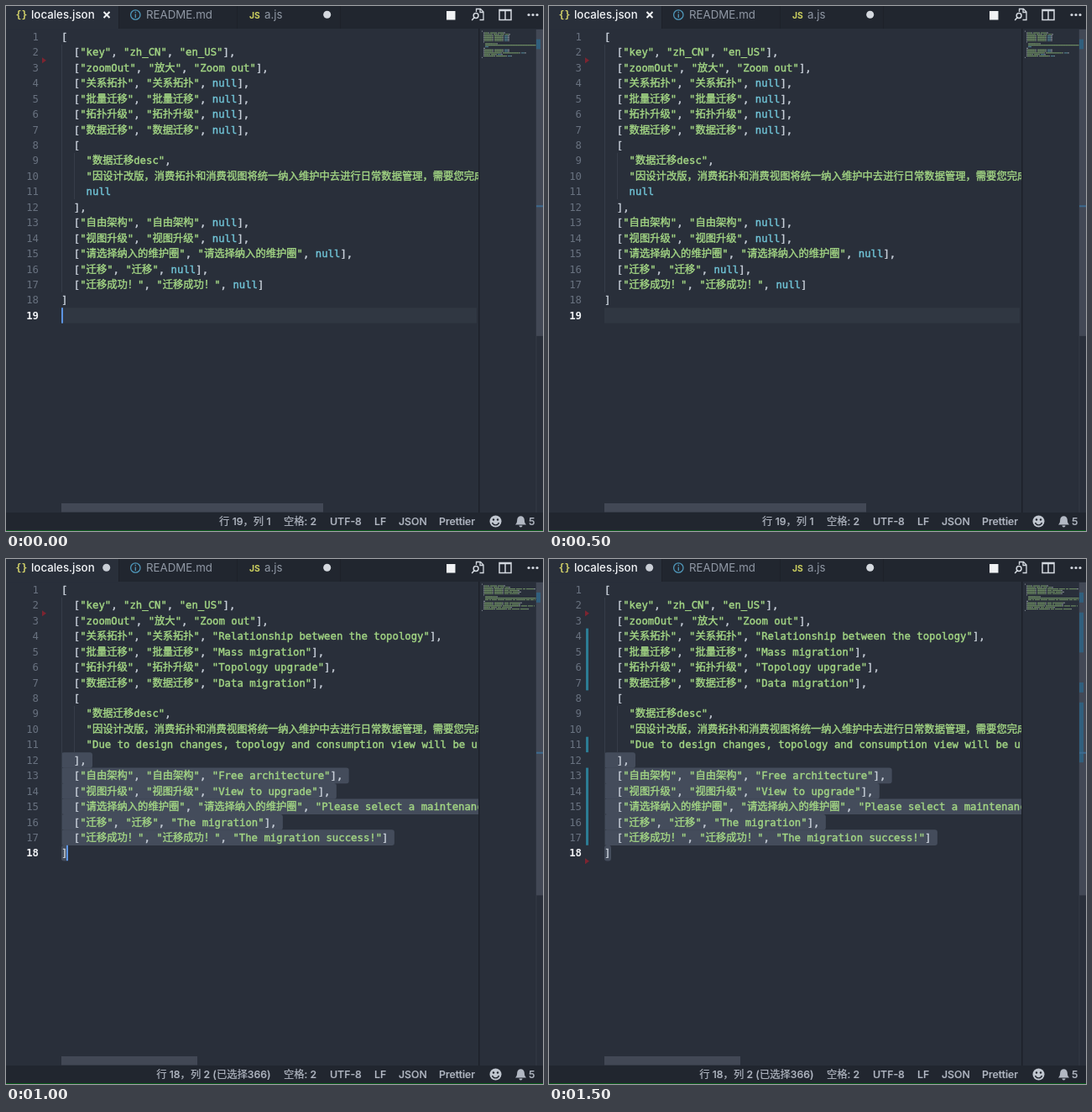
These frames come from a looping animation (640x625 px, 1.6 s). An HTML page with a canvas:

```html
<!DOCTYPE html>
<html lang="zh">
<head>
<meta charset="utf-8">
<style>
  html, body { margin: 0; width: 100%; height: 100%; overflow: hidden; background: #292f3a; }
  canvas { display: block; }
</style>
</head>
<body>
<canvas id="stage" width="640" height="625"></canvas>
<script>
const ctx = document.getElementById('stage').getContext('2d');
const LOOP = 1600, TRANSLATED = 1000, GUTTER = 1200;
const LEFT = 66, RIGHT = 563, TOP = 27.3, ROW = 18.44, CHAR = 7.405;
const MONO = '12.3px "DejaVu Sans Mono", "Noto Sans CJK SC", monospace';
const ui = (size, weight = 500) => `${weight} ${size}px Inter, "Noto Sans CJK TC", sans-serif`;
const C = {
  editor: '#292f3a', bar: '#21262f', line: '#1d2129', text: '#c8cfd9', string: '#a3d684',
  nil: '#70c3d6', number: '#68717f', guide: '#363d49', select: '#444c5b', current: '#303742',
  cursor: '#5c94e2', thumb: '#424855', added: '#2c7c94', removed: '#7d2430', status: '#b2b8c3'
};

// Arrays are [key, zh, en] or [zh, en] rows; plain strings stay as they are.
const entries = [
  '[', ['key', 'zh_CN', 'en_US'], ['zoomOut', '放大', 'Zoom out'],
  ['关系拓扑', 'Relationship between the topology'], ['批量迁移', 'Mass migration'],
  ['拓扑升级', 'Topology upgrade'], ['数据迁移', 'Data migration'],
  '  [', '    "数据迁移desc",',
  '    "因设计改版，消费拓扑和消费视图将统一纳入维护中去进行日常数据管理，需要您完成迁移",',
  '', '  ],',
  ['自由架构', 'Free architecture'], ['视图升级', 'View to upgrade'],
  ['请选择纳入的维护圈', 'Please select a maintenance circle'], ['迁移', 'The migration'],
  ['迁移成功！', 'The migration success!'], ']'
];
const DESC = '"Due to design changes, topology and consumption view will be unified in maintenance"';

function buildLines(translated) {
  return entries.map((e, i) => {
    if (i === 10) return '    ' + (translated ? DESC : 'null');
    if (typeof e === 'string') return e;
    const [key, zh, en] = e.length === 3 ? e : [e[0], e[0], e[1]];
    const last = e.length === 3 || translated ? `"${en}"` : 'null';
    return `  ["${key}", "${zh}", ${last}]${i === 16 ? '' : ','}`;
  }).concat(translated ? [] : ['']);
}
const documents = [buildLines(false), buildLines(true)];

const rowTop = n => TOP + (n - 1) * ROW;
const tokens = s => s.match(/"[^"]*"|null|[^"n]+/g) || [];
const tokenColor = s => s[0] === '"' ? C.string : s === 'null' ? C.nil : C.text;

function rect(x, y, w, h, color) {
  ctx.fillStyle = color;
  ctx.fillRect(x, y, w, h);
}
// A thin outline thickens the glyphs without changing their advance.
function text(s, x, y, color, font, { align = 'left', outline = 0 } = {}) {
  ctx.font = font;
  ctx.textAlign = align;
  ctx.fillStyle = ctx.strokeStyle = color;
  ctx.fillText(s, x, y);
  if (!outline) return;
  ctx.lineWidth = outline;
  ctx.strokeText(s, x, y);
}
function dot(x, y, r, color) {
  ctx.fillStyle = color;
  ctx.beginPath();
  ctx.arc(x, y, r, 0, 7);
  ctx.fill();
}
function stroke(d, color, width = 1.3) {
  ctx.strokeStyle = color;
  ctx.lineWidth = width;
  ctx.stroke(new Path2D(d));
}
function fill(d, color) {
  ctx.fillStyle = color;
  ctx.fill(new Path2D(d));
}

function drawTabs(dirty) {
  rect(0, 0, 640, 27, C.bar);
  rect(0, 0, 134, 27.5, C.editor);
  for (const x of [134, 275, 398]) rect(x, 0, 1, 27, C.line);
  text('{}', 11.5, 15, '#d3d26a', '700 11.5px "DejaVu Sans Mono", monospace');
  text('locales.json', 30, 15.3, '#f2f4f7', ui(13.3));
  if (dirty) dot(119.7, 10.3, 4.5, '#c9ced6');
  else stroke('M116.5 7l7 7m0-7l-7 7', '#f2f4f7', 2);
  stroke('M160 10.5a5.7 5.7 0 1 0-11.4 0a5.7 5.7 0 1 0 11.4 0M154.3 9.5v4.4M154.3 6.7v1.6', '#4f97b9');
  text('README.md', 167, 15.3, '#9098a5', ui(13.3, 400));
  text('JS', 290, 14.6, '#cdd05f', ui(10.3, 700));
  text('a.js', 308, 15.3, '#9098a5', ui(13.3, 400));
  dot(382.7, 10.3, 4.5, '#d5d9df');

  const icon = '#d3d8df';
  rect(525, 6, 10.5, 10.5, '#f0f2f4');
  stroke('M560.5 7V3.500h5l3.500 3.500v9.500h-4.500M565 3.500v4h4', icon);
  stroke('M563 11.500a2.900 2.900 0 1 0-5.800 0a2.900 2.900 0 1 0 5.800 0M558 13.700l-2.800 3.300', icon, 1.5);
  stroke('M588 4.5h14v12h-14zM595 4.5v12M588 5.5h14', icon, 1.5);
  for (const x of [623, 628, 633]) dot(x, 10.5, 1.6, icon);
}

function drawSelection(lines) {
  for (let n = 12; n <= 18; n++) {
    const width = ctx.measureText(lines[n - 1]).width + (n < 18 ? CHAR : 0.6);
    ctx.fillStyle = C.select;
    ctx.beginPath();
    ctx.roundRect(LEFT, rowTop(n), width, ROW + 0.2, 3);
    ctx.fill();
  }
}

function drawCode(lines, translated, cursorOn) {
  const active = lines.length;
  ctx.save();
  ctx.beginPath();
  ctx.rect(0, 27, RIGHT, 576);
  ctx.clip();
  ctx.font = MONO;
  ctx.textAlign = 'left';
  if (translated) drawSelection(lines);
  else rect(LEFT, rowTop(19), 495, ROW, C.current);
  rect(LEFT, rowTop(2), 1, ROW * 16, C.guide);
  rect(81, rowTop(9), 1, ROW * 3, C.guide);

  lines.forEach((line, i) => {
    const y = rowTop(i + 1) + 13.6, on = i + 1 === active;
    text(i + 1, 39, y, on ? '#f0f2f5' : C.number, (on ? '700 ' : '') + MONO, { align: 'right' });
    let x = LEFT;
    for (const token of tokens(line)) {
      text(token, x, y, tokenColor(token), MONO, { outline: 0.4 });
      x += ctx.measureText(token).width;
    }
  });
  if (cursorOn) rect(translated ? 72 : LEFT, rowTop(active), 2, ROW, C.cursor);
  ctx.restore();
}

const changes = [[4, 7], [11, 11], [13, 17]];

function drawGutter(marked) {
  const removed = marked ? [3, 19] : [3];
  for (const n of removed) fill(`M43 ${rowTop(n) - 3}l5 3.5l-5 3.5z`, C.removed);
  if (!marked) return;
  for (const [a, b] of changes) rect(44, rowTop(a), 3, (b - a + 1) * ROW, C.added);
}

function drawMinimap(lines, marked) {
  rect(RIGHT, 27, 1.5, 576, '#1d2129');
  ctx.globalAlpha = 0.62;
  lines.forEach((line, i) => {
    let x = 567;
    for (const token of tokens(line)) for (const ch of token) {
      const w = ch > '\u2e80' ? 2 : 1;
      if (ch !== ' ' && x < 631) rect(x, 29.5 + i * 1.84, w - 0.15, 1.2, tokenColor(token));
      x += w;
    }
  });
  ctx.globalAlpha = 1;

  // The ruler maps the document plus one screen of overscroll onto the editor height.
  const count = lines.length, step = 577 / (count + 30.5);
  const rulerY = n => 28 + (n - 1) * step;
  rect(631.5, 28, 1, 575, '#343a45');
  rect(632, 28, 8, 31.3 * step, C.thumb);
  const marks = marked ? [[2, 2], ...changes, [18, 18]] : [[2, 2]];
  for (const [a, b] of marks) rect(632, rulerY(a), 5, (b - a + 1) * step, '#315f7d');
  rect(632, rulerY(count) - 0.5, 8, 2, '#3d6a8f');
}

function drawStatus(translated) {
  rect(LEFT, 592, translated ? 162 : 312, 10.5, C.thumb);
  rect(0, 603, 640, 22, C.bar);
  const font = ui(12.3), y = 617.8, outline = 0.2;
  text(translated ? '行 18，列 2 (已选择366)' : '行 19，列 1', 315.5, y, C.status, font, { align: 'right', outline });
  const items = [['空格: 2', 331], ['UTF-8', 386], ['LF', 439], ['JSON', 468], ['Prettier', 516], ['5', 623]];
  for (const [label, x] of items) text(label, x, y, C.status, font, { outline });
  dot(583.5, 613.5, 7, '#c0c6cf');
  dot(581, 611.5, 1.2, C.bar);
  dot(586, 611.5, 1.2, C.bar);
  stroke('M579.5 615a4.2 4.2 0 0 0 8 0', C.bar);
  fill('M607 617.5c2-2 2-3.5 2.2-6c.2-2.6 1.8-4.2 4.3-4.2s4.1 1.6 4.3 4.2c.2 2.5.2 4 2.2 6zM611.5 618.5h4a2 2 0 0 1-4 0z', C.status);
  rect(0, 624, 640, 1, '#0b5d1b');
}

function draw() {
  const t = performance.now() % LOOP;
  const translated = t >= TRANSLATED, marked = t >= GUTTER;
  const cursorOn = t < 300 || (t >= 800 && t < 1500);
  const lines = documents[+translated];
  rect(0, 0, 640, 625, C.editor);
  drawTabs(translated);
  drawCode(lines, translated, cursorOn);
  drawGutter(marked);
  drawMinimap(lines, marked);
  drawStatus(translated);
  requestAnimationFrame(draw);
}
draw();
</script>
</body>
</html>
```
